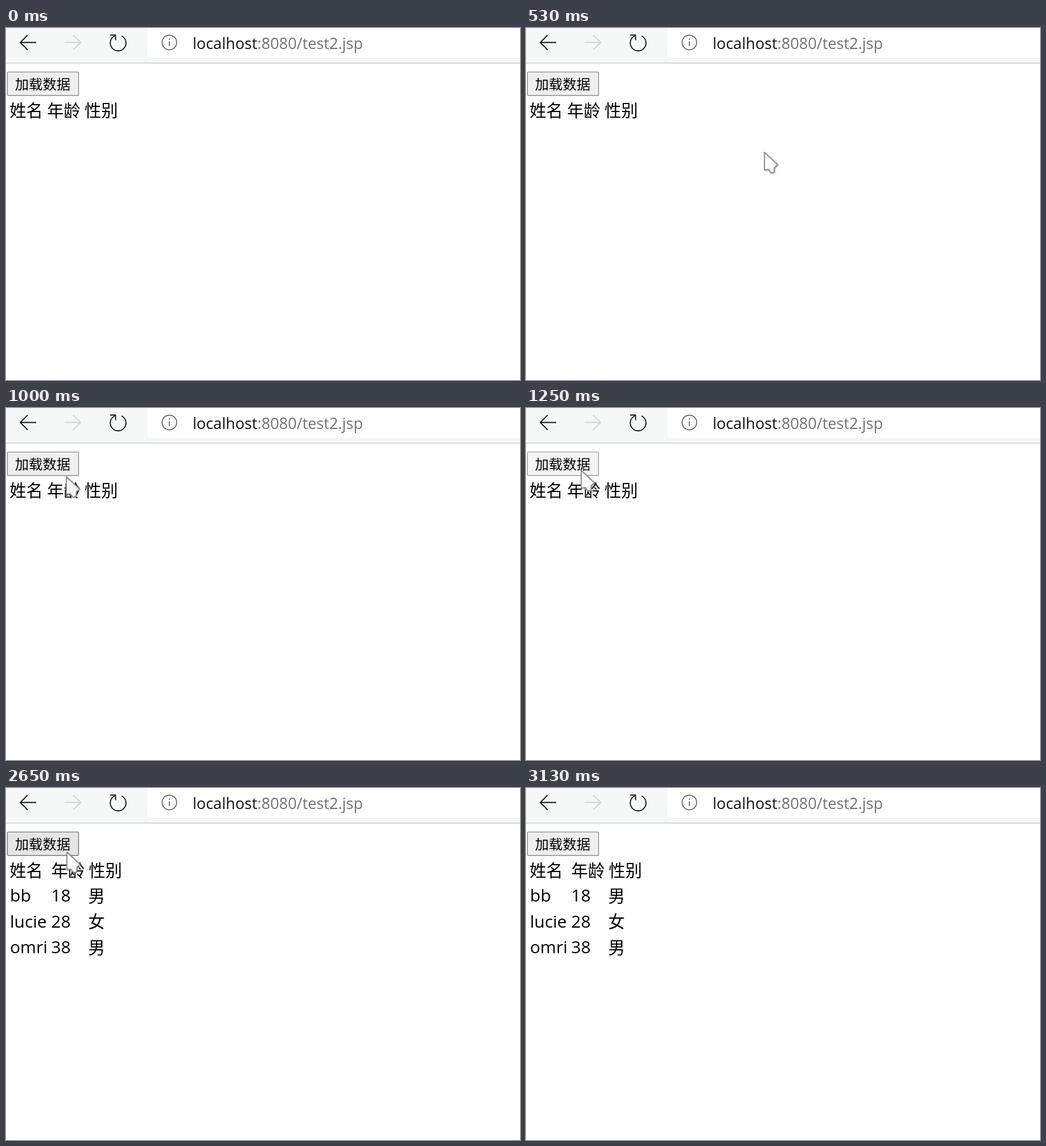
Animation of 903 by 620 pixels, one loop 3.38 s. Source, as an HTML page:

```html
<!DOCTYPE html>
<html lang="zh-CN">
<head>
<meta charset="utf-8">
<style>
  html, body { margin: 0; width: 100%; height: 100%; overflow: hidden; background: #fff; }
  svg { display: block; }
  text { font-family: "Open Sans", "Noto Sans CJK SC", "Noto Sans CJK", sans-serif; }
  .line { fill: none; stroke: #111; stroke-width: 1.8; }
  .cell { font-size: 30px; }
  .han { font-size: 29.3px; font-weight: 350; }
</style>
</head>
<body>
<svg width="903" height="620" viewBox="0 0 903 620">
  <defs>
    <filter id="soft" x="-50%" y="-50%" width="200%" height="200%">
      <feDropShadow dx="1" dy="1" stdDeviation="1.2" flood-color="#000" flood-opacity=".3"/>
    </filter>
  </defs>

  <rect width="903" height="61" fill="#f6f8f8"/>
  <rect y="61" width="903" height="1.5" fill="#c9cecd"/>
  <rect x="247" y="-10" width="680" height="64.5" rx="7" fill="#f1f3f3"/>
  <rect x="248" y="-10" width="680" height="63" rx="6" fill="#fff"/>
  <path class="line" d="M53 25.5H25M38 12.5L25 25.5L38 38.5"/>
  <path class="line" style="stroke:#d0d2d2" d="M103 25.5H131M118 12.5L131 25.5L118 38.5"/>
  <path class="line" d="M203 14A13.8 13.8 0 1 1 191 14M183 12.5H192.5V21.5"/>
  <g class="line" style="stroke:#666">
    <circle cx="287" cy="25.5" r="12.8" stroke-width="1.7"/>
    <path d="M287 23.5V32M287 18.5V20.8"/>
  </g>
  <text x="328" y="37" font-size="27.1" fill="#737373"><tspan fill="#111">localhost</tspan>:8080/test2.jsp</text>

  <rect id="button" x="2.5" y="77.5" width="125" height="41.3" rx="1.5" stroke-width="1.2"/>
  <text x="15.7" y="107.8" font-size="24.4" font-weight="350">加载数据</text>
  <g id="table"></g>

  <g id="arrow" filter="url(#soft)">
    <path d="M1 1V32L8 31L12.5 37L18 36L18.5 28L24 22.5Z" fill="#fff" fill-opacity=".93"
          stroke="#8a8e8e" stroke-width="2" stroke-linejoin="round"/>
  </g>
  <g id="beam" fill="none" filter="url(#soft)">
    <path d="M-6 -17H6M-6 17H6M0 -17V17" stroke="#888" stroke-width="4.5"/>
    <path d="M-5 -17H5M-5 17H5M0 -17V17" stroke="#eee" stroke-width="1.5"/>
  </g>
</svg>
<script>
const LOOP = 3380, LOADED = 1320;
const $ = id => document.getElementById(id);

// start time, x, y, pointer shape
const moves = [
  [0, 0, 0, ""],
  [70, 612, 393, "arrow"], [120, 590, 346, "arrow"], [160, 590, 318, "arrow"],
  [210, 618, 286, "arrow"], [380, 619, 286, "arrow"],
  [450, 577, 265, "arrow"], [530, 418, 218, "arrow"], [610, 250, 172, "arrow"],
  [690, 165, 143, "beam"], [760, 143, 138, "beam"], [850, 112, 120, "arrow"],
  [1000, 105, 120, "arrow"], [1090, 97, 111, "arrow"], [1170, 96, 109, "arrow"],
  [2650, 106, 112, "arrow"], [2710, 150, 140, "arrow"], [2790, 250, 203, "arrow"],
  [2870, 420, 330, "arrow"], [2960, 602, 472, "arrow"], [3040, 778, 590, "arrow"],
  [3130, 0, 0, ""]
];

// start time, fill, border
const looks = [
  [0, "#efefef", "#767676"], [1090, "#e5e5e5", "#5a5a5a"], [1250, "#f5f5f5", "#8d8d8d"],
  [1320, "#e5e5e5", "#5a5a5a"], [2710, "#efefef", "#767676"]
];

const heads = ["姓名", "年龄", "性别"];
const people = [["bb", 18, "男"], ["lucie", 28, "女"], ["omri", 38, "男"]];

const cell = (x, y, type, s) => `<text class="${type}" x="${x}" y="${y}">${s}</text>`;
const header = cols => heads.map((s, i) => cell(cols[i], 156.2, "han", s)).join("");
const empty = header([6.3, 72, 138]);
const full = header([6.3, 79.5, 145.3]) + people.map(([name, age, sex], i) => {
  const y = 200.2 + 45.3 * i;
  return cell(7, y, "cell", name) + cell(79.3, y, "cell", age) + cell(144.5, y + 0.8, "han", sex);
}).join("");

const at = (list, t) => list.filter(item => item[0] <= t).pop();
let shown;

function draw(now) {
  const t = now % LOOP;
  const [, x, y, shape] = at(moves, t);
  for (const id of ["arrow", "beam"]) {
    $(id).setAttribute("visibility", id === shape ? "visible" : "hidden");
    $(id).setAttribute("transform", `translate(${x} ${y})`);
  }
  const [, fill, border] = at(looks, t);
  $("button").setAttribute("fill", fill);
  $("button").setAttribute("stroke", border);
  const rows = t < LOADED ? empty : full;
  if (rows !== shown) $("table").innerHTML = shown = rows;
}

const start = performance.now();
function tick() {
  draw(performance.now() - start);
  requestAnimationFrame(tick);
}
tick();
</script>
</body>
</html>
```
